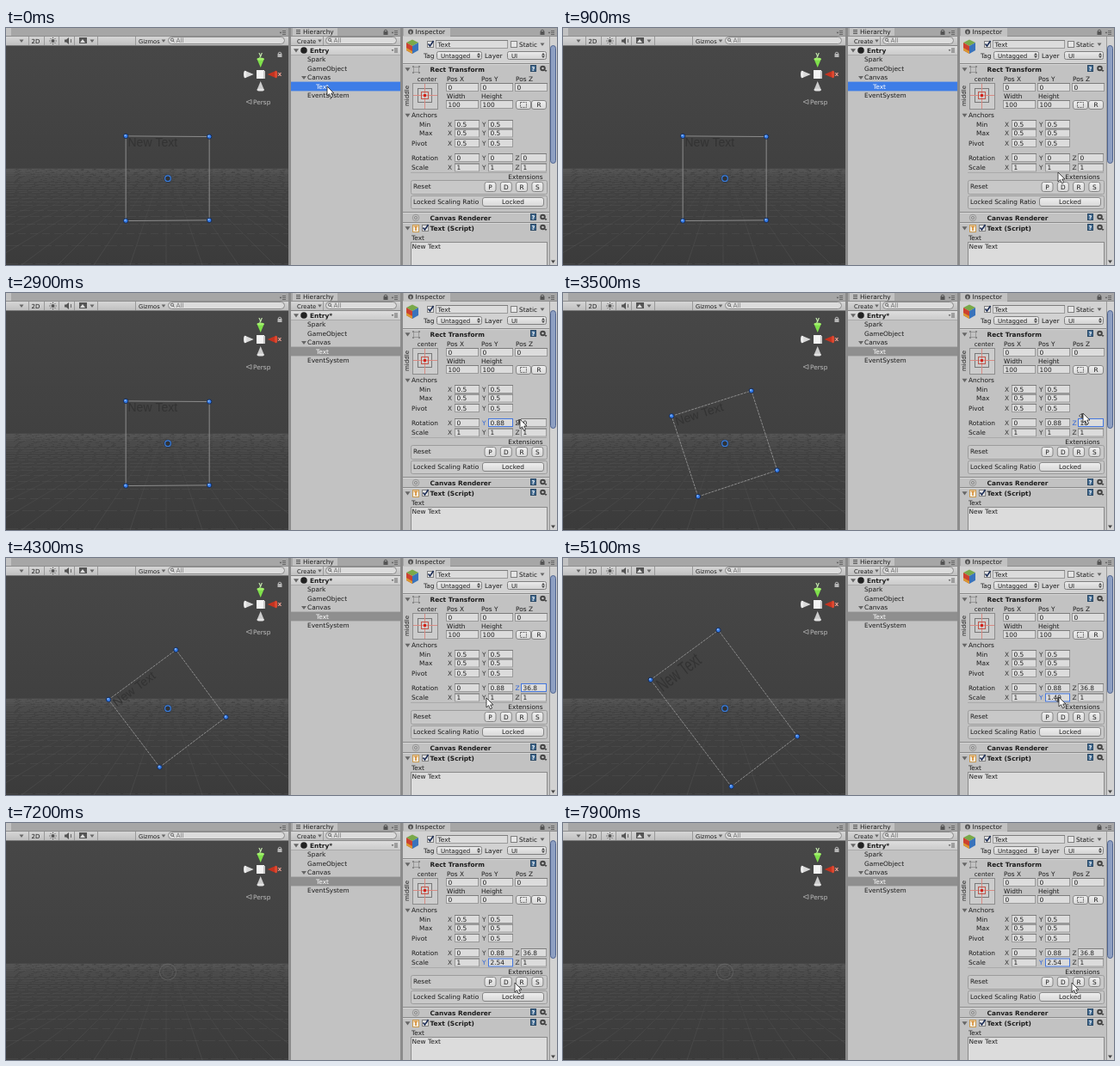
These frames come from a looping animation (640 by 276 pixels, 8 s). An HTML page with a canvas:

```html
<!DOCTYPE html>
<html lang="en">
<head>
<meta charset="utf-8">
<title>Editor transform demo</title>
<style>
html, body { margin: 0; width: 100%; height: 100%; overflow: hidden; background: #c2c2c2; }
canvas { display: block; }
</style>
</head>
<body>
<canvas id="stage" width="640" height="276"></canvas>
<script>
const ctx = document.getElementById('stage').getContext('2d');
const LOOP = 8000, STEP = 100;
const INK = '#1c1c1c', PANEL = '#c2c2c2', BLUE = '#2c62d8';
const UI_FONT = '"DejaVu Sans", sans-serif';

// Keyframes: [time, value...]
const POINTER = [
  [300, 373, 68], [800, 545, 155], [1000, 605, 180], [1200, 521, 146], [1500, 540, 134],
  [1700, 551, 149], [1900, 551, 149], [2500, 586, 149], [2600, 586, 149], [2900, 597, 147],
  [3000, 597, 147], [3500, 604, 140], [3900, 595, 130], [4200, 595, 130], [4300, 558, 163],
  [4500, 553, 159], [4800, 558, 162], [4900, 558, 162], [5100, 576, 162], [5300, 613, 162],
  [5800, 613, 162], [6200, 574, 196], [6400, 562, 189], [6600, 562, 189], [7000, 580, 185],
  [7100, 580, 186], [7400, 612, 186], [7500, 612, 186], [7700, 576, 186], [7900, 591, 186]
];
const ROT_Y = [[1900, 0], [2400, 0.88]];
const ROT_Z = [[3000, 0], [3500, 18], [3900, 36.8]];
const SCALE_Y = [[4900, 1], [5000, 1.18], [5100, 1.49], [5200, 2.1], [5300, 2.54]];
const STRETCH = [[4900, 1], [5000, 1.2], [5100, 1.58], [5200, 2.13], [5300, 2.55]];

function sample(keys, t) {
  if (t <= keys[0][0]) return keys[0].slice(1);
  for (let i = 1; i < keys.length; i++) {
    const a = keys[i - 1], b = keys[i];
    if (t <= b[0]) {
      const k = (t - a[0]) / (b[0] - a[0]);
      return a.slice(1).map((v, j) => v + (b[j + 1] - v) * k);
    }
  }
  return keys[keys.length - 1].slice(1);
}

function box(x, y, w, h, fill, stroke) {
  if (fill) { ctx.fillStyle = fill; ctx.fillRect(x, y, w, h); }
  if (stroke) {
    ctx.strokeStyle = stroke;
    ctx.lineWidth = 1;
    ctx.strokeRect(x + 0.5, y + 0.5, w - 1, h - 1);
  }
}
function round(x, y, w, h, r, fill, stroke) {
  ctx.beginPath();
  ctx.roundRect(x + 0.5, y + 0.5, w - 1, h - 1, r);
  ctx.fillStyle = fill;
  ctx.fill();
  ctx.strokeStyle = stroke;
  ctx.lineWidth = 1;
  ctx.stroke();
}
function poly(points, fill, stroke) {
  ctx.beginPath();
  points.forEach(p => ctx.lineTo(p[0], p[1]));
  ctx.closePath();
  if (fill) { ctx.fillStyle = fill; ctx.fill(); }
  if (stroke) { ctx.strokeStyle = stroke; ctx.stroke(); }
}
function line(x1, y1, x2, y2, color, width = 1) {
  ctx.beginPath();
  ctx.moveTo(x1, y1);
  ctx.lineTo(x2, y2);
  ctx.strokeStyle = color;
  ctx.lineWidth = width;
  ctx.stroke();
}
function disc(x, y, r, fill, stroke, width = 1) {
  ctx.beginPath();
  ctx.arc(x, y, r, 0, Math.PI * 2);
  if (fill) { ctx.fillStyle = fill; ctx.fill(); }
  if (stroke) { ctx.strokeStyle = stroke; ctx.lineWidth = width; ctx.stroke(); }
}
// y is the vertical middle of the line of text
function label(s, x, y, { color = INK, bold = false, align = 'left', size = 7.4 } = {}) {
  ctx.font = `${bold ? 'bold ' : ''}${size}px ${UI_FONT}`;
  ctx.fillStyle = color;
  ctx.textAlign = align;
  ctx.fillText(s, x, y + 2.7);
}
function triangleDown(x, y, r = 3, color = '#666') {
  poly([[x - r, y - r * 0.6], [x + r, y - r * 0.6], [x, y + r * 0.8]], color);
}
function gradient(y0, y1, top, bottom) {
  const g = ctx.createLinearGradient(0, y0, 0, y1);
  g.addColorStop(0, top);
  g.addColorStop(1, bottom);
  return g;
}
function field(x, y, w, value, focused) {
  box(x, y, w, 10, '#dcdcdc', focused ? '#4476dd' : '#9a9a9a');
  if (!focused) line(x, y + 0.5, x + w, y + 0.5, '#7c7c7c');
  label(value, x + 2.5, y + 5);
}
function button(s, x, y, w, h) {
  round(x, y, w, h, 2.5, gradient(y, y + h, '#f1f1f1', '#d6d6d6'), '#868686');
  label(s, x + w / 2, y + h / 2, { align: 'center' });
}
function popup(s, x, y, w) {
  round(x, y, w, 10, 2, gradient(y, y + 10, '#eeeeee', '#d0d0d0'), '#808080');
  label(s, x + 5, y + 5, { size: 7 });
  poly([[x + w - 6, y + 4.5], [x + w - 2, y + 4.5], [x + w - 4, y + 2]], '#444');
  poly([[x + w - 6, y + 5.5], [x + w - 2, y + 5.5], [x + w - 4, y + 8]], '#444');
}
function checkbox(x, y, checked) {
  box(x, y, 8, 8, '#e6e6e6', '#808080');
  if (!checked) return;
  ctx.beginPath();
  ctx.moveTo(x + 1.5, y + 3.5);
  ctx.lineTo(x + 3.5, y + 6);
  ctx.lineTo(x + 7.5, y);
  ctx.strokeStyle = '#1b2c55';
  ctx.lineWidth = 1.6;
  ctx.stroke();
}
function search(x, w) {
  round(x, 10, w, 9, 4.5, '#dcdcdc', '#8b8b8b');
  disc(x + 5, 13.7, 1.6, null, '#666');
  line(x + 6.2, 15, x + 7.5, 16.5, '#666');
  label('All', x + 9.5, 14.5, { color: '#777' });
}
function padlock(x, y, color) {
  box(x - 2.5, y, 5, 4, color);
  ctx.beginPath();
  ctx.arc(x, y, 1.8, Math.PI, 0);
  ctx.strokeStyle = color;
  ctx.lineWidth = 1;
  ctx.stroke();
}
function menuIcon(x, y) {
  triangleDown(x, y, 1.4, '#555');
  for (let i = -1; i < 2; i++) line(x + 2, y + i * 2, x + 6, y + i * 2, '#666');
}

function drawGrid() {
  const vx = 186, vy = 150;
  ctx.save();
  ctx.beginPath();
  ctx.rect(0, 163, 328, 113);
  ctx.clip();
  box(0, 163, 328, 113, gradient(163, 276, '#434343', '#3b3b3b'));
  for (let n = 4; n < 46; n++) {
    const y = Math.round(vy + 620 / n) + 0.5;
    ctx.setLineDash([9 + n % 7, 2 + n % 4]);
    line(0, y, 328, y, 'rgba(105,105,105,.2)');
  }
  ctx.setLineDash([]);
  const fade = gradient(163, 276, 'rgba(95,95,95,.04)', 'rgba(105,105,105,.28)');
  for (let k = -40; k <= 40; k++) line(vx, vy, vx + k * 42, 276, fade);
  ctx.restore();
}

// Cone pointing at the cube from the given direction
function axisCone(angle, side, base) {
  ctx.save();
  ctx.translate(295.7, 54);
  ctx.rotate(angle);
  poly([[8, 0], [18, -4.2], [18, 4.2]], side);
  ctx.beginPath();
  ctx.ellipse(18, 0, 1.6, 4.2, 0, 0, Math.PI * 2);
  ctx.fillStyle = base;
  ctx.fill();
  ctx.restore();
}

function drawAxisGizmo() {
  axisCone(-Math.PI / 2, '#7fe04b', '#a2f06c');
  axisCone(0, '#c53320', '#dd4930');
  axisCone(Math.PI, '#d8d8d8', '#eee');
  axisCone(Math.PI / 2, '#ccc', '#e2e2e2');
  box(291, 49, 9, 10, '#f4f4f4');
  box(299, 50, 2, 9, '#c9c9c9');
  label('y', 295.7, 30, { color: '#c5e9ad', align: 'center', bold: true });
  label('x', 318, 53.5, { color: '#eaa092', align: 'center', bold: true });
  ctx.lineWidth = 1;
  poly([[279, 86], [285, 83.5], [285, 88.5]], null, '#999');
  label('Persp', 287, 86, { color: '#bdbdbd' });
  padlock(318, 30, '#b6b6b6');
}

function drawRect(t) {
  const cx = 188, cy = 175.2;
  if (t >= 7000) {
    disc(cx, 173.5, 9.5, null, 'rgba(125,125,125,.45)');
    disc(cx, 173.5, 6, null, 'rgba(125,125,125,.2)');
    return;
  }
  const [angle] = sample(ROT_Z, t), [stretch] = sample(STRETCH, t);
  const a = angle * Math.PI / 180, c = Math.cos(a), s = Math.sin(a);
  const half = 48.5, tall = 49 * stretch;
  // The plane recedes slightly to the right
  const at = (x, y) => {
    const dx = x * c + y * s, near = 1 - dx * 0.00014;
    return [cx + dx * near, cy + (y * c - x * s) * near];
  };
  const corners = [at(-half, -tall), at(half, -tall), at(half, tall), at(-half, tall)];

  ctx.save();
  ctx.translate(cx, cy);
  ctx.rotate(-a);
  ctx.scale(1, stretch);
  ctx.font = '14px "Liberation Sans", Arial, sans-serif';
  ctx.textAlign = 'left';
  ctx.fillStyle = '#333';
  ctx.fillText('New Text', -46.5, -37);
  ctx.restore();

  ctx.lineWidth = 1;
  if (angle) ctx.setLineDash([3, 1]);
  poly(corners, null, '#8c8c8c');
  ctx.setLineDash([]);
  for (const [x, y] of corners) {
    disc(x, y, 2.7, '#347be8', '#182b51');
    disc(x - 0.7, y - 0.9, 1, '#8cbcfa');
  }
  disc(cx, cy, 3.4, '#343434', '#172b4f', 2.2);
  disc(cx, cy, 3.3, null, '#4384dc', 1.2);
}

function drawScene(t) {
  ctx.save();
  ctx.beginPath();
  ctx.rect(0, 0, 328, 276);
  ctx.clip();
  box(0, 20, 328, 256, gradient(20, 170, '#474747', '#404040'));
  drawGrid();
  drawRect(t);
  drawAxisGizmo();
  box(0, 0, 328, 9, '#a6a6a6');
  box(0, 0, 6, 9, PANEL);
  menuIcon(319, 5.5);
  box(0, 9, 328, 12, gradient(9, 21, '#d8d8d8', '#bebebe'));
  line(0, 9.5, 328, 9.5, '#8e8e8e');
  line(0, 20.5, 328, 20.5, '#777');
  triangleDown(18, 15, 2.5);
  for (const x of [26, 44, 61, 79, 106]) line(x + 0.5, 10, x + 0.5, 20, '#999');
  label('2D', 34.5, 15, { align: 'center', size: 7 });
  disc(54.5, 15, 2, '#555');
  for (let i = 0; i < 8; i++) {
    const b = i * Math.PI / 4;
    line(54.5 + 3 * Math.cos(b), 15 + 3 * Math.sin(b), 54.5 + 4.2 * Math.cos(b), 15 + 4.2 * Math.sin(b), '#555');
  }
  poly([[68, 13.5], [70, 13.5], [73, 11], [73, 19], [70, 16.5], [68, 16.5]], '#555');
  line(75.5, 13, 75.5, 17, '#666');
  box(85, 11, 9, 7, '#555');
  poly([[86, 17], [89, 13], [92, 17]], '#ddd');
  triangleDown(100, 15, 2.5);
  line(150.5, 10, 150.5, 20, '#999');
  label('Gizmos', 154, 15, { size: 6.7 });
  triangleDown(183, 15, 2.3);
  search(188, 136);
  ctx.restore();
}

function drawHierarchy(t) {
  box(331, 0, 127, 276, PANEL);
  box(331, 0, 127, 9, '#a6a6a6');
  box(333, 0, 52, 9, PANEL);
  for (let i = 0; i < 3; i++) line(337, 2.5 + i * 2, 342, 2.5 + i * 2, '#555');
  label('Hierarchy', 345, 4.3);
  padlock(441, 4, '#555');
  menuIcon(449, 5.5);
  box(331, 9, 127, 12, gradient(9, 21, '#d8d8d8', '#bebebe'));
  line(331, 9.5, 458, 9.5, '#8e8e8e');
  line(331, 20.5, 458, 20.5, '#858585');
  label('Create', 338, 15, { size: 6.7 });
  triangleDown(364.5, 15, 2.3);
  line(368.5, 10, 368.5, 20, '#999');
  search(371, 83);
  box(331, 21, 127, 10, gradient(21, 31, '#dedede', '#cbcbcb'));
  line(331, 31.5, 458, 31.5, '#aaa');
  triangleDown(337, 26, 3);
  disc(346, 26, 3.8, '#222');
  label(t >= 2000 ? 'Entry*' : 'Entry', 353, 26, { bold: true });
  menuIcon(449, 26);
  label('Spark', 350, 36.7);
  label('GameObject', 350, 47.2);
  triangleDown(346, 57.7);
  label('Canvas', 350, 57.7);
  box(331, 62.6, 127, 10.8, t >= 2000 ? '#8f8f8f' : '#3e7de7');
  label('Text', 360, 68, { color: '#fff' });
  label('EventSystem', 350, 78.3);
}

function heading(title, y, icon, foldable = true) {
  line(461, y - 6.5, 631, y - 6.5, '#8a8a8a');
  line(461, y - 5.5, 631, y - 5.5, '#d6d6d6');
  if (foldable) triangleDown(466.5, y, 3);
  icon();
  label(title, 492.5, y, { bold: true });
  box(609, y - 5, 7, 8, '#41698f', '#294763');
  label('?', 612.5, y - 1, { color: '#fff', bold: true, align: 'center', size: 6.5 });
  disc(623.5, y - 1, 2.3, null, '#444', 2);
  triangleDown(627, y + 2, 1.5, '#444');
}

function axisRow(name, y, values, { x = 471, focus = -1 } = {}) {
  label(name, x, y);
  values.forEach((value, i) => {
    const left = [521, 560, 598][i];
    label('XYZ'[i], [513, 553, 591.5][i], y, { color: i === focus ? BLUE : '#333' });
    field(left, y - 5, [29, 29, 30][i], value, i === focus);
  });
}

function drawAnchorPreset() {
  label('center', 489, 59.5, { align: 'center', size: 7 });
  ctx.save();
  ctx.translate(465.5, 79);
  ctx.rotate(-Math.PI / 2);
  label('middle', 0, 0, { align: 'center', size: 7 });
  ctx.restore();
  box(472, 64, 30, 31, '#cccccc', '#8c8c8c');
  box(478, 70, 17, 17, null, '#777');
  line(473, 78.5, 501, 78.5, '#d88a82');
  line(486.5, 65, 486.5, 94, '#d88a82');
  box(482, 74, 9, 9, null, '#c0564c');
  box(485, 77, 3, 3, '#d2231c');
}

function drawCube() {
  poly([[465, 17], [472, 13.5], [479, 17], [472, 21]], '#79a94a');
  poly([[465, 17], [472, 21], [472, 30], [465, 26]], '#cc4230');
  poly([[479, 17], [472, 21], [472, 30], [479, 26]], '#3a73bb');
  poly([[465, 23], [472, 27], [472, 30], [465, 26]], '#d99a33');
}

function drawScrollbar() {
  box(631, 10, 9, 266, '#d2d2d2');
  line(631.5, 10, 631.5, 276, '#999');
  round(632, 20, 7, 138, 3, '#8d9fc2', '#4c628f');
  triangleDown(635.5, 272, 2.5, '#444');
}

function drawInspector(t) {
  const rotY = sample(ROT_Y, t)[0], rotZ = sample(ROT_Z, t)[0], scaleY = sample(SCALE_Y, t)[0];
  const show = (v, digits) => String(+v.toFixed(digits));
  const size = t >= 7000 ? '0' : '100';

  box(461, 0, 179, 276, PANEL);
  box(461, 0, 179, 9, '#a6a6a6');
  box(462, 0, 54, 9, PANEL);
  disc(470, 4.5, 3, '#555');
  line(470, 3.5, 470, 6.5, '#eee');
  label('Inspector', 475.5, 4.3);
  padlock(623, 4, '#555');
  menuIcon(631, 5.5);
  line(516, 9.5, 640, 9.5, '#8e8e8e');

  box(461, 10, 170, 31, '#d2d2d2');
  drawCube();
  checkbox(489, 15, true);
  field(499, 14, 84, 'Text');
  checkbox(586, 15, false);
  label('Static', 596, 19);
  triangleDown(623, 19, 2.5);
  label('Tag', 485, 32);
  popup('Untagged', 500, 27, 53);
  label('Layer', 556, 32);
  popup('UI', 582, 27, 46);

  heading('Rect Transform', 48, () => {
    box(473, 45, 7, 7, null, '#999');
    for (const [x, y] of [[472, 44], [479, 44], [472, 51], [479, 51]]) box(x, y, 2, 2, '#888');
  });
  drawAnchorPreset();
  ['X', 'Y', 'Z'].forEach((axis, i) => {
    const x = [511, 551, 591][i];
    label('Pos ' + axis, x + 1, 58.8);
    field(x, 64, 38, '0');
  });
  label('Width', 512, 79.3);
  label('Height', 552, 79.3);
  field(511, 84, 38, size);
  field(551, 84, 38, size);
  button('', 592, 84, 18, 11);
  ctx.setLineDash([2, 1]);
  box(597, 86, 8, 7, null, '#666');
  ctx.setLineDash([]);
  button('R', 610, 84, 18, 11);

  triangleDown(466.5, 101.5);
  label('Anchors', 471, 101.5);
  axisRow('Min', 112, ['0.5', '0.5'], { x: 480 });
  axisRow('Max', 122.5, ['0.5', '0.5'], { x: 480 });
  axisRow('Pivot', 134, ['0.5', '0.5']);
  const rotFocus = t < 2000 ? -1 : t < 3100 ? 1 : t < 4900 ? 2 : -1;
  axisRow('Rotation', 151, ['0', show(rotY, 2), show(rotZ, 1)], { focus: rotFocus });
  axisRow('Scale', 162.5, ['1', show(scaleY, 2), '1'], { focus: t >= 4900 ? 1 : -1 });

  line(470, 168.5, 628, 168.5, '#aaa');
  label('Extensions', 623.5, 173, { align: 'right' });
  round(470, 177, 159, 17, 2, '#c8c8c8', '#9c9c9c');
  label('Reset', 473, 184.7);
  ['P', 'D', 'R', 'S'].forEach((s, i) => button(s, 555.5 + i * 18.3, 179, 14, 12));
  round(470, 195, 159, 16, 2, '#c8c8c8', '#9c9c9c');
  label('Locked Scaling Ratio', 473, 202.7);
  button('Locked', 553, 197, 72, 11);

  heading('Canvas Renderer', 221, () => {
    disc(476, 221, 3.8, null, '#999');
    disc(476, 221, 1.6, null, '#888');
  }, false);
  heading('Text (Script)', 233, () => {
    box(472, 229, 8, 9, '#f3f0e8', '#c99a50');
    label('T', 476, 233.5, { align: 'center', bold: true, color: '#d37d12' });
    checkbox(483, 229, true);
  });
  label('Text', 471, 243.8);
  box(470, 249, 159, 30, '#dcdcdc', '#8a8a8a');
  label('New Text', 471.5, 254.5);

  drawScrollbar();
}

function drawPointer(t) {
  const [px, py] = sample(POINTER, t), x = Math.round(px), y = Math.round(py);
  const dragging = (t >= 1600 && t < 4300) || (t >= 4800 && t < 5900);
  ctx.lineWidth = 0.8;
  if (dragging) {
    poly([[x - 4.5, y + 3], [x - 1.5, y + 0.5], [x - 1.5, y + 5.5]], '#ddd', '#333');
    poly([[x + 2.5, y + 3], [x - 0.5, y + 0.5], [x - 0.5, y + 5.5]], '#ddd', '#333');
  }
  poly([[x, y], [x, y + 11], [x + 2.6, y + 8.7], [x + 4.5, y + 13], [x + 6.5, y + 12],
    [x + 4.7, y + 8], [x + 8, y + 8]], '#fff', '#222');
}

let lastTick = -1;
const start = performance.now();
function frame(now) {
  const tick = Math.floor((Math.max(0, now - start) % LOOP) / STEP);
  if (tick !== lastTick) {
    lastTick = tick;
    const t = tick * STEP;
    box(0, 0, 640, 276, '#8b8b8b');
    drawScene(t);
    drawHierarchy(t);
    drawInspector(t);
    drawPointer(t);
  }
  requestAnimationFrame(frame);
}
frame(start);
</script>
</body>
</html>
```
